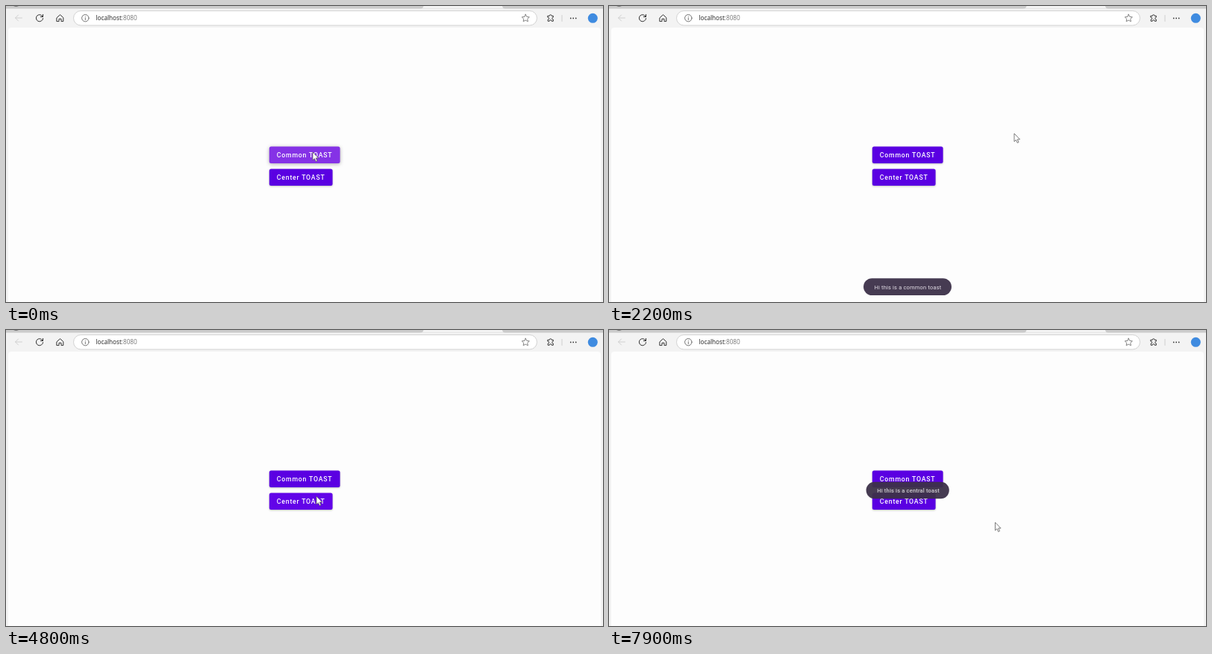
Write an HTML page that moves like this. It is 800 by 397 pixels and loops after 8000 ms.

```html
<!DOCTYPE html>
<html lang="en">
<head>
<meta charset="utf-8">
<title>Toast demo</title>
<style>
  html, body { margin: 0; width: 100%; height: 100%; overflow: hidden; background: #f3f3f3; }
  svg { display: block; width: 800px; height: 397px; }
  .icon { fill: none; stroke: #333; stroke-width: 1; stroke-linecap: round; stroke-linejoin: round; }
  .label { font: 500 8.75px Roboto, sans-serif; letter-spacing: .78px; fill: #fff; }
  .note { font: 400 7.5px Roboto, sans-serif; letter-spacing: .18px; }
  .url { font: 8.2px "Open Sans", sans-serif; fill: #222; }
  .btn { filter: drop-shadow(0 1px 1px rgba(0, 0, 0, .24)); }
  .btn.raised { filter: drop-shadow(0 1.6px 2.4px rgba(0, 0, 0, .32)); }
  .pill { fill: #3d3149; fill-opacity: .95; }
</style>
</head>
<body>
<svg viewBox="0 0 800 397" xmlns="http://www.w3.org/2000/svg">
  <!-- browser frame -->
  <rect width="800" height="397" fill="#f3f3f3"/>
  <rect width="800" height="3.6" fill="#cbcbcb"/>
  <path d="M555 3.6Q559 3.6 559.5 0H665Q665.500 3.600 669 3.600Z" fill="#f3f3f3"/>
  <path d="M10 0H17Q13.500 1.500 10 0Z" fill="#555"/>
  <path d="M3 397V33Q3 29 7 29H793Q797 29 797 33V397Z" fill="#fdfdfd"/>
  <rect x="90.500" y="6.500" width="621" height="19.500" rx="9.750" fill="#fff" stroke="#d2d2d2"/>

  <!-- toolbar icons -->
  <g class="icon">
    <path d="M21.500 16H12.500M16.500 12L12.500 16L16.500 20" stroke="#d0d0d0"/>
    <path d="M49.200 14.300A4.600 4.600 0 1 0 49.600 16.600M49.500 11.400V14.500H46.400"/>
    <path d="M68.200 15.600L72.500 11.700L76.800 15.600V20.600H74V17.300H71V20.600H68.200Z"/>
    <g stroke="#666" stroke-width=".9">
      <circle cx="106.300" cy="16.200" r="4.700"/>
      <path d="M106.300 15.800V18.600M106.300 13.900V14"/>
    </g>
    <path id="star" stroke="#777" stroke-width=".9"/>
    <path d="M726.200 13.300H728.200A1.500 1.500 0 0 1 731.200 13.300H733.300V15.100A1.500 1.500 0 0 0 733.300 18.100V20.300H731.200A1.500 1.500 0 0 0 728.200 20.300H726.200V18.100A1.500 1.500 0 0 0 726.200 15.100Z"/>
    <path d="M745 12.500V20.500" stroke="#cfcfcf"/>
    <path d="M756.700 16.400h.01M760.200 16.400h.01M763.700 16.400h.01" stroke-width="1.700"/>
  </g>
  <circle cx="786.300" cy="16.300" r="6.500" fill="#3f8be0"/>
  <text class="url" x="120.500" y="19.400">localhost<tspan fill="#777">:8080</tspan></text>

  <!-- page -->
  <g class="btn" id="common">
    <rect x="352.800" y="188.600" width="94.800" height="22.400" rx="2.500"/>
    <text class="label" x="362.800" y="202.900">Common TOAST</text>
  </g>
  <g class="btn" id="center">
    <rect x="352.800" y="218.600" width="84.800" height="22.400" rx="2.500"/>
    <text class="label" x="362.800" y="232.900">Center TOAST</text>
  </g>
  <g id="lowToast">
    <rect class="pill" x="-59" y="-11.400" width="118" height="22.800" rx="11.400"/>
    <text class="note" x="-44.500" y="2.900" fill="#e2dde6">Hi this is a common toast</text>
  </g>
  <g id="midToast">
    <rect class="pill" x="-55.600" y="-11.200" width="111.200" height="22.400" rx="11.200"/>
    <text class="note" x="-41" y="2.800" fill="#cdc8d2" style="font-weight:500">Hi this is a central toast</text>
  </g>
  <path id="cursor" d="M0 0V10.800L2.500 8.600L4.200 12.500L6 11.700L4.300 7.900H7.600Z"
        fill="#fff" stroke="#5c5c5c" stroke-width=".8" stroke-linejoin="round"/>
</svg>
<script>
const LOOP = 8000, STEP = 100;
const $ = id => document.getElementById(id);

// Pointer stops: time, x, y
const path = [
  [0, 411, 196], [1600, 411, 196], [2100, 543, 171], [4100, 543, 171],
  [4600, 416, 223], [5500, 416, 223], [6000, 517.5, 258], [LOOP, 517.5, 258]
];
const buttons = [
  { el: $('common'), box: [352, 188, 448, 211], press: [0, 300] },
  { el: $('center'), box: [352, 218, 438, 241], press: [4900, 5200] }
];
const toasts = [
  { el: $('lowToast'), x: 400, y: 376.6, from: 400, to: 3500 },
  { el: $('midToast'), x: 400.2, y: 215, from: 5200, to: 8300 }
];

$('star').setAttribute('d', 'M' + Array.from({ length: 10 }, (_, i) => {
  const a = (i / 5 - .5) * Math.PI, r = i % 2 ? 2.6 : 5.3;
  return (696.3 + r * Math.cos(a)).toFixed(2) + ' ' + (16.5 + r * Math.sin(a)).toFixed(2);
}).join('L') + 'Z');

const clamp = v => Math.max(0, Math.min(1, v));
const ease = p => p * p * (3 - 2 * p);

function pointerAt(t) {
  const i = path.findIndex(p => p[0] > t);
  const [t0, x0, y0] = path[i - 1], [t1, x1, y1] = path[i];
  const p = ease((t - t0) / (t1 - t0));
  return [x0 + (x1 - x0) * p, y0 + (y1 - y0) * p];
}

function drawButton({ el, box, press }, t, x, y) {
  const hover = x > box[0] && x < box[2] && y > box[1] && y < box[3];
  const pressed = t >= press[0] && t < press[1];
  el.firstElementChild.setAttribute('fill', pressed ? '#8532e6' : hover ? '#6204e8' : '#5a00e2');
  el.classList.toggle('raised', pressed);
}

function drawToast({ el, x, y, from, to }, t) {
  const enter = clamp((t - from + 60) / 180), leave = clamp((to - t) / 200);
  const shown = t >= from && t < to;
  const scale = .8 + .2 * ease(Math.min(enter, leave));
  el.setAttribute('opacity', shown ? Math.min(enter, leave) : 0);
  el.setAttribute('transform', `translate(${x} ${y}) scale(${scale})`);
}

function draw(now) {
  const t = Math.floor((now % LOOP) / STEP) * STEP;
  const [x, y] = pointerAt(t);
  buttons.forEach(b => drawButton(b, t, x, y));
  toasts.forEach(n => drawToast(n, t));
  $('cursor').setAttribute('transform', `translate(${x} ${y})`);
}

const start = performance.now();
function tick() {
  draw(performance.now() - start);
  requestAnimationFrame(tick);
}
tick();
</script>
</body>
</html>
```
